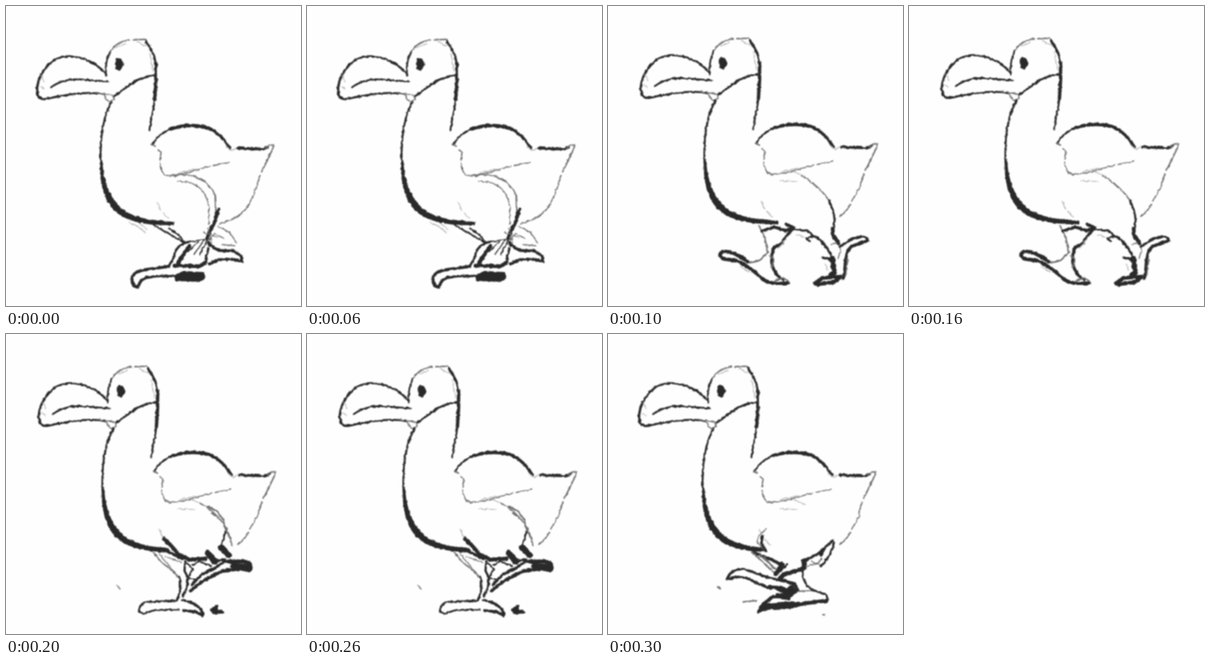
Write an HTML page that moves like this. It is 504 by 513 pixels and loops after 0.4 s.

```html
<!DOCTYPE html>
<html lang="en">
<head>
<meta charset="utf-8">
<title>Walking bird</title>
<style>
html, body { margin: 0; width: 100%; height: 100%; overflow: hidden; background: #fefefe; }
svg { display: block; width: 100%; height: 100%; }
path { fill: none; stroke: #2a2a2a; stroke-linecap: round; stroke-linejoin: round; }
.fine { stroke: #707070; }
.faint { stroke: #b4b4b4; }
.ink { fill: #292929; }
</style>
</head>
<body>
<svg viewBox="0 0 504 513" preserveAspectRatio="none">
  <defs>
    <filter id="pencil" x="0" y="0" width="504" height="513" filterUnits="userSpaceOnUse" color-interpolation-filters="sRGB">
      <feTurbulence type="fractalNoise" baseFrequency=".16" numOctaves="2" seed="4" result="grain"/>
      <feDisplacementMap in="SourceGraphic" in2="grain" scale="4" xChannelSelector="R" yChannelSelector="G"/>
      <feGaussianBlur stdDeviation="1.15"/>
    </filter>
  </defs>
  <g filter="url(#pencil)"><g id="body"></g><g id="poses"></g></g>
</svg>
<script>
const STEP = 100;
const WEIGHT = 1.3;
const SHIFTS = [[0, 0], [3, -2], [3, -2], [0, -2]];

// Each stroke: [width, path, class]
const body = [
  // beak
  [2.8, 'M171 117C157 99 132 86 106 86C91 87 80 92 72 101'],
  [3.2, 'M72 101C59 115 53 129 53 146C54 158 61 161 73 158'],
  [2.8, 'M73 158C96 153 140 145 166 151'],
  [2.5, 'M77 139C92 128 113 124 134 126L174 129'],
  [1.2, 'M60 119L65 130M59 137L64 142', 'faint'],
  [1.6, 'M154 148L184 153L185 160L176 164L167 152', 'fine'],
  // head
  [2.2, 'M171 119C170 103 171 89 179 77'],
  [1.8, 'M179 77C186 66 196 60 211 58M217 58L237 57L243 69', 'fine'],
  [1.2, 'M188 71L205 64M224 61L240 69', 'faint'],
  [3, 'M239 61C249 74 254 84 256 100'],
  [4.4, 'M256 99L256 128L254 160'],
  [2.5, 'M254 158C253 178 247 193 245 213'],
  [1.2, 'M245 81L251 112', 'faint'],
  [3, 'M186 153C203 144 216 123 252 119'],
  [1.5, 'M190 90L196 91L200 100L194 110L188 107L187 98Z', 'ink'],
  // breast
  [2.6, 'M180 164C166 190 160 224 162 270'],
  [1, 'M161 264C160 310 170 345 202 361C221 370 242 374 270 374L270 368C246 367 225 363 206 353C181 338 166 306 164 264Z', 'ink'],
  // back, wing and tail
  [2.6, 'M250 237C257 225 269 215 284 210'],
  [4.5, 'M282 210C303 203 332 202 350 211'],
  [4, 'M349 210C364 218 374 229 382 243'],
  [1.7, 'M250 237L256 240M260 246L265 250L263 263M263 269C264 280 268 288 276 290', 'fine'],
  [1.7, 'M276 290C300 289 328 280 348 274M355 273L382 267', 'fine'],
  [1.2, 'M376 241L385 247L393 243M294 285L328 278', 'faint'],
  [3.4, 'M396 243L440 245L447 241'],
  [1.8, 'M444 243L450 238L457 238L455 247', 'fine'],
  [2, 'M454 248L437 283M434 289L428 310', 'fine'],
  [1.2, 'M259 336L264 349M268 353L278 363', 'faint']
];

const tail = [1.6, 'M430 311L416 334M414 339L404 354L395 360', 'fine'];
const crease = [1.3, 'M294 299L322 300M318 284L338 292', 'faint'];

const poses = [
  [
    [1.6, 'M288 291C318 283 347 299 357 323L358 350', 'fine'],
    [1.4, 'M293 300C326 299 343 316 347 346L347 373', 'fine'],
    [1.6, 'M427 312C419 335 408 354 392 362L365 373', 'fine'],
    [1.2, 'M210 370L226 377L238 388M228 372L241 382', 'faint'],
    [5, 'M262 371L284 372'],
    [5, 'M363 348L355 372L344 395'],
    [2.2, 'M252 375L273 386L303 404M278 380L296 393L304 403'],
    [3, 'M315 403C298 405 288 416 286 431L278 445'],
    [5, 'M313 411L294 439'],
    [5, 'M288 444L332 445L341 438'],
    [3, 'M346 413L340 441'],
    [4, 'M278 445C256 450 234 449 224 455C212 461 214 471 219 479L226 480C229 469 234 464 251 463L286 461'],
    [3, 'M289 462L303 455L337 457L339 465L331 470L291 468Z', 'ink'],
    [4, 'M345 404L354 413L364 418L388 419C400 425 405 429 403 437L387 433L362 434L348 441'],
    [1.5, 'M307 404L348 398M321 425L338 401M331 425L347 393M311 420L329 403'],
    [1.4, 'M338 387L362 396M345 380L352 407M342 407L356 389L372 397M362 376L383 388L394 405M370 408L391 410', 'fine']
  ],
  [
    tail, crease,
    [1.8, 'M330 290C350 301 369 318 378 334', 'fine'],
    [2.8, 'M378 334C384 346 389 362 386 377'],
    [5, 'M384 380L384 390L394 406'],
    [5, 'M264 370L288 370'],
    [2.2, 'M257 376C267 389 271 407 272 422', 'fine'],
    [2.6, 'M273 420C265 434 253 439 240 438', 'fine'],
    [4, 'M263 385L284 378L304 384L318 379L305 374'],
    [4, 'M313 384L301 397L297 406L285 413'],
    [4, 'M284 412C276 429 279 449 290 461L299 468'],
    [5, 'M238 437C224 426 210 419 196 420C189 424 190 431 202 433L221 436'],
    [4.5, 'M219 435C237 443 253 456 264 467L278 474L308 474'],
    [2, 'M276 428L283 432L280 447M284 470L300 465L309 471', 'fine'],
    [2.6, 'M315 382L342 385L351 394L339 397L345 403'],
    [3.4, 'M350 392C365 400 376 413 383 431'],
    [7, 'M383 431L387 455L381 460'],
    [4, 'M367 430L379 433'],
    [5, 'M354 474L366 465L397 463L387 472L358 476Z'],
    [4, 'M402 466C407 449 402 424 416 411L444 401'],
    [3, 'M443 399C440 392 428 394 413 400L396 412'],
    [1.5, 'M406 461L410 433M391 405L381 408M398 415L393 432', 'fine'],
    [1.3, 'M292 414L306 395M322 391L335 395M371 442L375 452M226 445L241 455', 'faint']
  ],
  [
    tail, crease,
    [1.7, 'M331 289C354 301 374 322 382 345L386 362', 'fine'],
    [2, 'M344 295L361 303L372 319L373 330L383 350M352 306L367 318', 'fine'],
    [4.5, 'M262 371L276 370'],
    [5, 'M270 350L284 364L295 377L314 386L341 384'],
    [4, 'M274 371L301 384'],
    [8, 'M344 374L357 389'],
    [8, 'M367 365L380 378'],
    [2.4, 'M375 338L368 362M357 389L375 385'],
    [2, 'M252 374L265 390L284 404L295 416', 'fine'],
    [1.4, 'M261 375L289 408M273 381L300 391', 'fine'],
    [2.6, 'M296 415C300 429 297 444 292 455'],
    [3, 'M306 389L305 405L311 417L309 435L302 448'],
    [2, 'M309 391L319 402L311 417L324 420M318 395L331 389L351 397'],
    [4.2, 'M315 440C329 425 347 416 371 405'],
    [3.6, 'M317 429L336 410L358 400L374 388'],
    [5, 'M374 389L403 389C419 389 421 398 416 404L400 401L372 405'],
    [7, 'M388 396L415 398'],
    [2.5, 'M292 456L241 458C231 459 227 469 227 475L236 478L254 472L294 471'],
    [3.5, 'M301 455C320 459 332 465 337 480'],
    [4, 'M304 473L324 475L336 481'],
    [3, 'M350 471L361 465L359 471L371 476L355 477Z', 'ink'],
    [1.6, 'M190 431L196 436', 'fine']
  ],
  [
    tail, crease,
    [1.8, 'M270 333L258 345L255 356L267 369', 'fine'],
    [3.4, 'M264 345L262 357L270 371'],
    [4, 'M250 374L264 380L280 386L295 394'],
    [2, 'M246 373L287 411M258 377L291 405M267 380L282 400', 'fine'],
    [6, 'M297 394L287 410'],
    [3, 'M288 411L307 393'],
    [6, 'M334 388L336 400L316 407L300 411L294 419'],
    [3.5, 'M335 388L359 376L384 353'],
    [3, 'M386 357C382 374 372 390 364 397'],
    [4, 'M362 374L367 371L364 378'],
    [1.7, 'M339 397L357 393L365 384M347 388L363 395', 'fine'],
    [3.2, 'M203 420C207 406 222 398 239 404L272 416L298 422'],
    [3.2, 'M203 420L221 415L236 417L253 425L272 433'],
    [5, 'M274 433L293 434L307 438'],
    [4.5, 'M293 420L318 427L324 437L309 449L289 446'],
    [3, 'M286 434L308 436L314 430L319 438L306 447Z', 'ink'],
    [4.5, 'M309 452L282 449L266 461L257 474'],
    [4, 'M258 474L268 463L306 460L332 462L312 467L274 469Z', 'ink'],
    [5, 'M304 465L333 461L373 456'],
    [2.6, 'M374 456C379 445 362 442 348 437C335 427 331 416 333 401'],
    [1.8, 'M324 440L347 439M231 458L253 456M187 432L192 435M368 480L370 480', 'fine']
  ]
];

function draw(parent, strokes) {
  for (const [width, d, kind] of strokes) {
    const path = document.createElementNS('http://www.w3.org/2000/svg', 'path');
    path.setAttribute('d', d);
    path.setAttribute('stroke-width', width * WEIGHT);
    if (kind) path.setAttribute('class', kind);
    parent.append(path);
  }
}

const torso = document.getElementById('body');
const holder = document.getElementById('poses');
draw(torso, body);
const groups = poses.map(strokes => {
  const group = document.createElementNS('http://www.w3.org/2000/svg', 'g');
  draw(group, strokes);
  holder.append(group);
  return group;
});

function render(time) {
  const index = Math.floor(time / STEP) % poses.length;
  torso.setAttribute('transform', `translate(${SHIFTS[index]})`);
  groups.forEach((group, i) => group.setAttribute('display', i === index ? 'inline' : 'none'));
}

const start = performance.now();
function tick() {
  render(performance.now() - start);
  requestAnimationFrame(tick);
}
tick();
</script>
</body>
</html>
```
